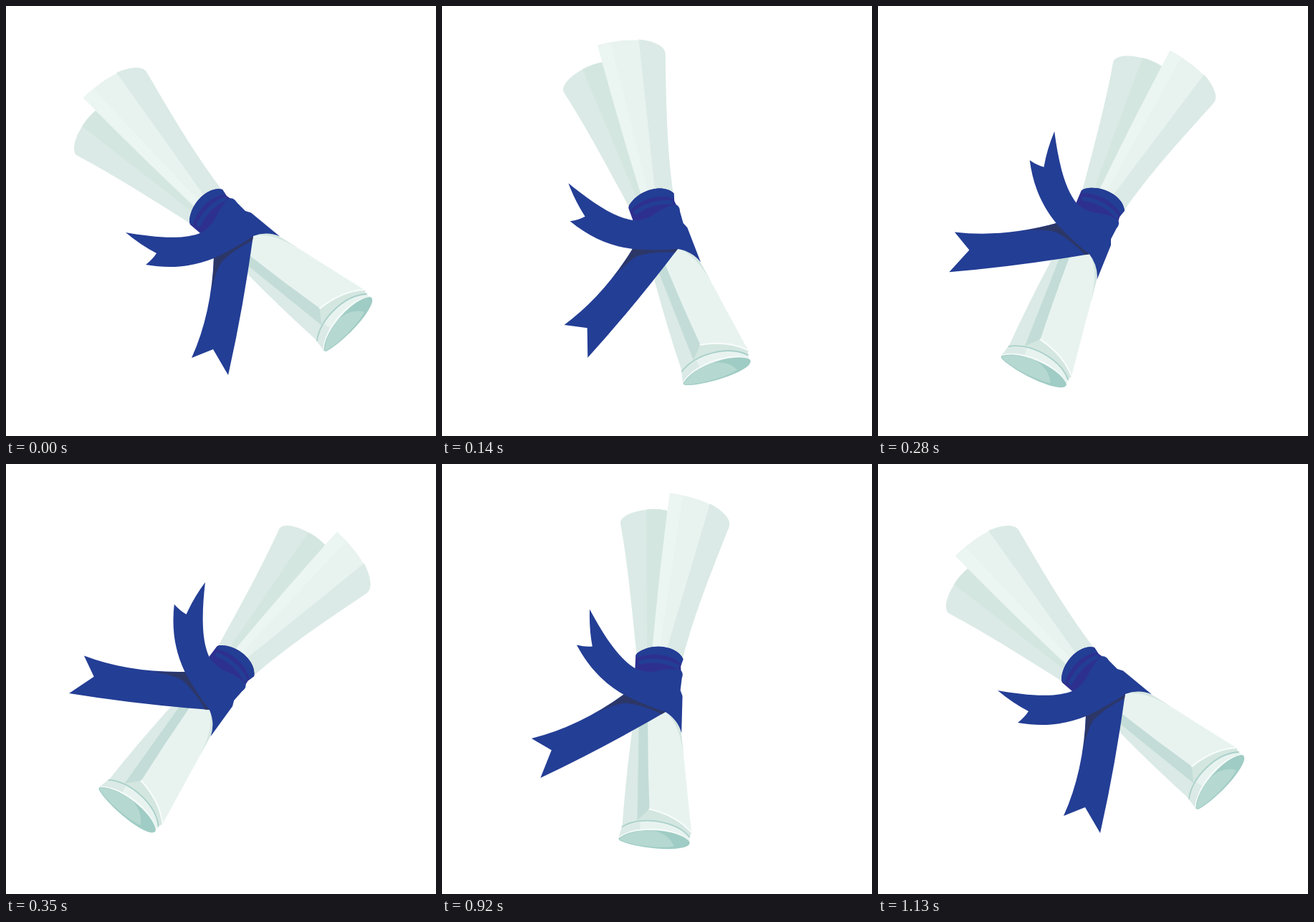
An HTML page that plays this animation: 600x600 px, repeating every 1.53 s.

```html
<!DOCTYPE html>
<html lang="en">
<head>
<meta charset="utf-8">
<title>Diploma scroll</title>
<style>
  html, body { margin: 0; width: 100%; height: 100%; overflow: hidden; background: #fff; }
  svg { display: block; width: 100vw; height: 100vh; }
  .light { fill: #e8f3f0; }
  .mid { fill: #dbeae6; }
  .shade { fill: #d4e6e0; }
  .fold { fill: #c3dcd7; }
  .ribbon { fill: #233e95; }
  .dark { fill: #2c3768; }
  .line { fill: none; stroke-linecap: round; }
</style>
</head>
<body>
<svg viewBox="0 0 600 600">
  <g id="scroll">
    <!-- flared sheets -->
    <path class="mid" d="M125 146C107 163 95 184 95 199Q95 207 100 209C151 236 204 270 258 304L285 285Z"/>
    <path class="shade" d="M125 146Q113 156 106 168L261 288L275 278Z"/>
    <path class="light" d="M108 128C130 107 158 87 182 86Q192 86 196 92C231 152 263 207 303 259L272 288Q184 206 108 128Z"/>
    <path fill="#ebf5f2" d="M108 128L122 116L271 274L264 281Q184 206 108 128Z"/>
    <path class="mid" d="M154 93Q170 86 182 86Q192 86 196 92C231 152 263 207 303 259L278 267Q217 181 154 93Z"/>

    <!-- lower roll -->
    <path class="mid" d="M330 320L345 321L500 396L503 403Q470 403 444 443L435 468Q385 423 338 375Z"/>
    <path class="fold" d="M335 340L348 340L438 422L441 446L336 361Z"/>
    <path class="shade" d="M438 422Q468 399 500 396L503 403Q470 404 440 445Z"/>
    <path class="light" d="M345 321Q362 314 382 322L500 396Q468 397 438 422Q388 386 341 349Z"/>
    <path class="shade" d="M348 320Q363 314 382 322L433 353Q394 328 372 322Q360 319 348 320Z"/>
    <path class="line" stroke="#f8fcfb" stroke-width="2" d="M438 422Q468 398 499 396"/>

    <!-- rolled end -->
    <path class="light" d="M434 468C437 438 472 402 503 402L511 408L445 482Z"/>
    <path class="mid" d="M434 468Q436 455 444 444L452 449Q444 462 444 482Z"/>
    <path class="line" stroke="#a9d0c9" stroke-width="1.8" d="M434 467C437 438 472 403 503 402"/>
    <path class="line" stroke="#f8fcfb" stroke-width="1.6" d="M443 478C446 448 480 409 508 406"/>
    <path fill="#9fccc4" d="M444 481C441 457 482 409 507 406Q512 406 511 413C505 435 463 475 446 482Z"/>
    <path fill="#b5d8d1" d="M445 480C444 465 455 449 464 437Q481 422 500 427C493 442 463 473 446 481Z"/>

    <!-- hanging tail -->
    <path class="ribbon" d="M290 350Q287 429 259 491L289 479L310 515Q331 422 345 320Z"/>
    <path class="dark" d="M290 350L345 320L344 327Q316 341 301 357Q292 371 286 400Q290 374 290 350Z"/>

    <!-- collar -->
    <path fill="#2e3090" d="M256 302C256 276 282 251 302 256L308 265L318 272L290 316L271 317L257 305Z"/>
    <path class="ribbon" d="M256 302C256 276 282 251 302 256L306 263C287 264 266 285 261 306Z"/>
    <path class="line" stroke="#233e95" stroke-width="6" d="M269 305Q281 280 305 269"/>

    <!-- wrap and side tail -->
    <path class="ribbon" d="M167 316C207 323 248 327 273 316Q288 307 294 292Q301 278 311 268.500Q318 267 322 274L334 286L342 288.500L382 321.500Q364 314 345 321Q320 338 290 352C260 364 230 367 195 361Q205 353 210 345Q187 333 167 316Z"/>
  </g>
</svg>
<script>
  const scroll = document.getElementById('scroll');
  const angles = [0, 12, 29.4, 52, 72.5, 86.5];
  const loop = 1530, step = 70, backAt = 850;

  function draw(now) {
    const t = now % loop;
    const up = Math.floor(t / step);
    const down = 4 - Math.floor((t - backAt) / step);
    const pose = Math.max(0, Math.min(5, up, down));
    scroll.setAttribute('transform', `rotate(${angles[pose]} 302.7 299.5)`);
  }

  let start;
  function tick(now) {
    start ??= now;
    draw(now - start);
    requestAnimationFrame(tick);
  }
  draw(0);
  requestAnimationFrame(tick);
</script>
</body>
</html>
```
